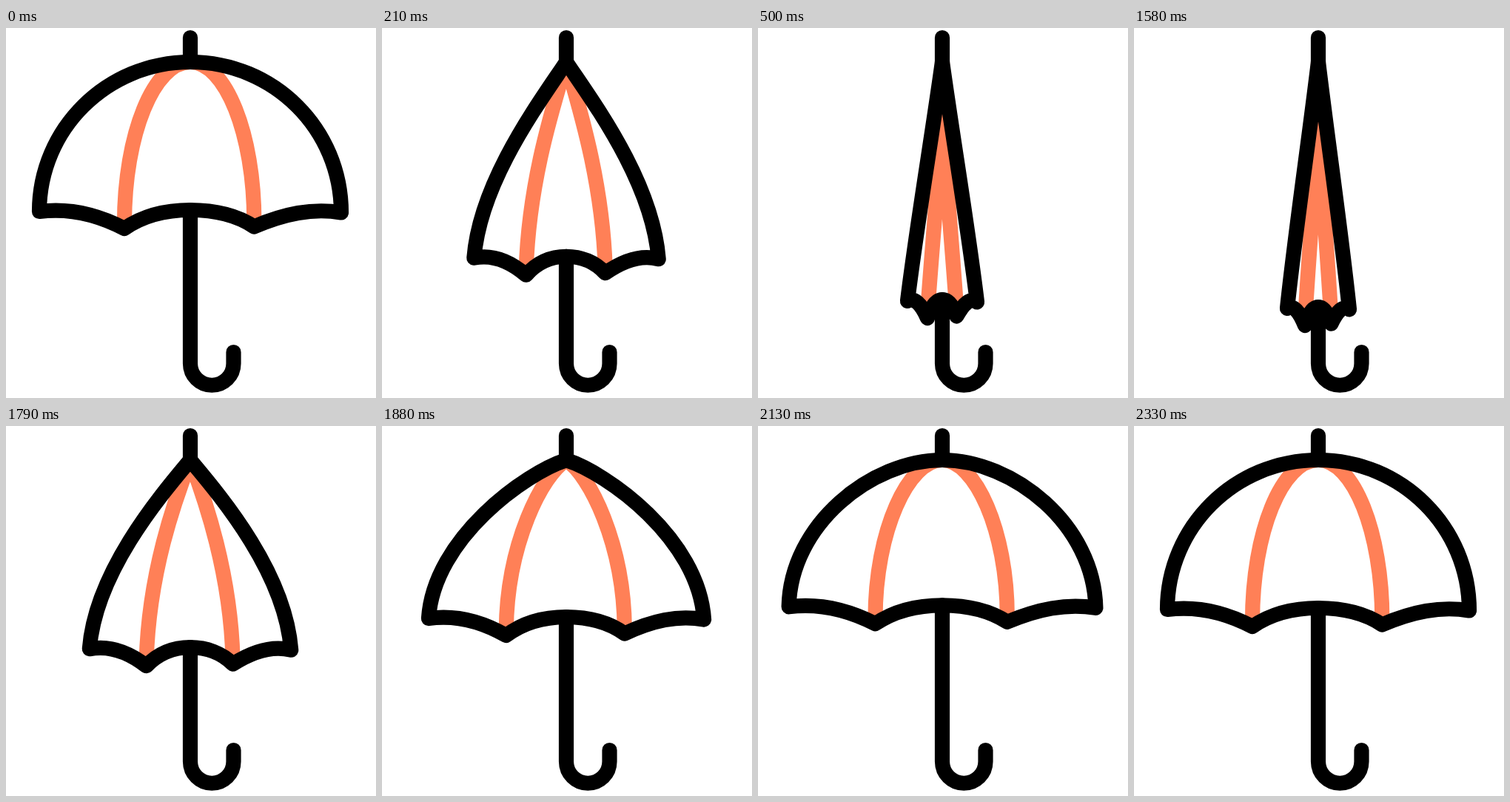
An HTML page for the animation above (3000 ms loop, 500 by 500 pixels).

```html
<!DOCTYPE html>
<html lang="en">
<head>
<meta charset="utf-8">
<title>Umbrella</title>
<style>
  html, body { margin: 0; width: 100%; height: 100%; overflow: hidden; background: #fff; }
  svg { display: block; width: 100vw; height: 100vh; }
  path { fill: none; stroke: #000; stroke-width: 20.2; stroke-linejoin: round; stroke-linecap: round; }
  #ribs { stroke: #ff8057; stroke-linecap: butt; }
</style>
</head>
<body>
<svg viewBox="0 0 500 500">
  <path id="ribs"/>
  <path id="stick"/>
  <path id="canopy"/>
</svg>
<script>
  const CX = 249, TOP = 46, LOOP = 3000, FPS = 24;
  const DROP = 23;      // depth of the hem's points below its tips
  const K = 0.5523;     // handle length of a quarter ellipse

  // Handles of a curve from the top: [x, y, x, y] as parts of its width and height
  const round = [K, 0, 1, 1 - K];
  const flatArm = [0.29, 0, 0.97, 0.42], flatRib = [0.41, 0, 1, 0.435];
  const slimArm = [0.3, 0.315, 0.76, 0.71], slimRib = [0, 0.345, 0.6, 0.655];

  // Half width, height of the tips, half distance of the ribs, curve handles
  const pose = (w, hem, v, arm, rib) => [
    w, hem, v,
    ...arm.map((k, i) => i % 2 ? TOP + k * (hem - TOP) : k * w),
    ...rib.map((k, i) => i % 2 ? TOP + k * (hem + DROP - 7 - TOP) : k * v)
  ];

  const open = pose(204, 248, 89, round, round);
  const over = pose(214, 237, 93.5, flatArm, flatRib);
  const shut = pose(47, 369, 20, slimArm, slimRib);
  const tight = pose(42, 379, 18, slimArm, slimRib);

  const mix = (a, b, k) => a.map((v, i) => v + (b[i] - v) * k);
  const swing = u => u * u * (3 - 2 * u);
  const settle = u => u * (2 - u);

  // [frame, pose, easing towards it]
  const keys = [
    [0, open], [1, over, settle], [8.8, tight, swing], [12, shut, settle],
    [37, shut, settle], [38, tight, settle], [47.4, over, swing],
    [56, open, settle], [72, open, settle]
  ];

  function poseAt(frame) {
    const i = keys.findIndex(k => k[0] > frame);
    const [from, a] = keys[i - 1], [to, b, ease] = keys[i];
    return mix(a, b, ease((frame - from) / (to - from)));
  }

  const shape = id => document.getElementById(id);
  const ribs = shape("ribs"), stick = shape("stick"), canopy = shape("canopy");

  // One half of the umbrella, from the axis outwards; the right one sits a little off
  function half(p, side) {
    const [w, hem, v, ax, ay, bx, by, rx, ry, sx, sy] = p;
    const right = side > 0;
    const at = (d, y) => [CX + side * d, y];
    const mid = hem - 2, span = w - v;
    const k = right ? 0.97 : 1;
    const valley = at(v * k, hem + DROP - (right ? 2.5 : 0));
    const tip = at(w, hem + (right ? 1.5 : 0));
    return {
      valley, tip,
      inner: [at(v * 0.37, mid), at(v * 0.72, mid + DROP / 3)],
      outer: [at(v + span * 0.33, hem + DROP * 0.14), at(v + span * 0.66, hem - DROP * 0.22)],
      arm: [at(ax, ay), at(bx, by)],
      rib: [at(rx * k, ry), at(sx * k, sy), [valley[0], valley[1] - 7]]
    };
  }

  function draw(p) {
    const l = half(p, -1), r = half(p, 1);
    const top = [CX, TOP], mid = [CX, p[1] - 2];
    const back = list => [...list].reverse();

    canopy.setAttribute("d", `M${l.tip}C` + [
      ...back(l.outer), l.valley, ...back(l.inner), mid,
      ...r.inner, r.valley, ...r.outer, r.tip,
      ...back(r.arm), top, ...l.arm, l.tip
    ].join(" ") + "Z");

    ribs.setAttribute("d", [l, r].map(s => `M${top}C${s.rib.join(" ")}`).join(""));

    stick.setAttribute("d",
      `M${CX} 13V${TOP}M${mid}V453.5A29.25 29.25 0 0 0 307.5 453.5V438`);
  }

  // Motion is held on a 24 fps grid; frame times are rounded to 10 ms
  function tick() {
    const t = performance.now() % LOOP;
    draw(poseAt(Math.floor((t + 4) * FPS / 1000) % 72));
    requestAnimationFrame(tick);
  }
  tick();
</script>
</body>
</html>
```
